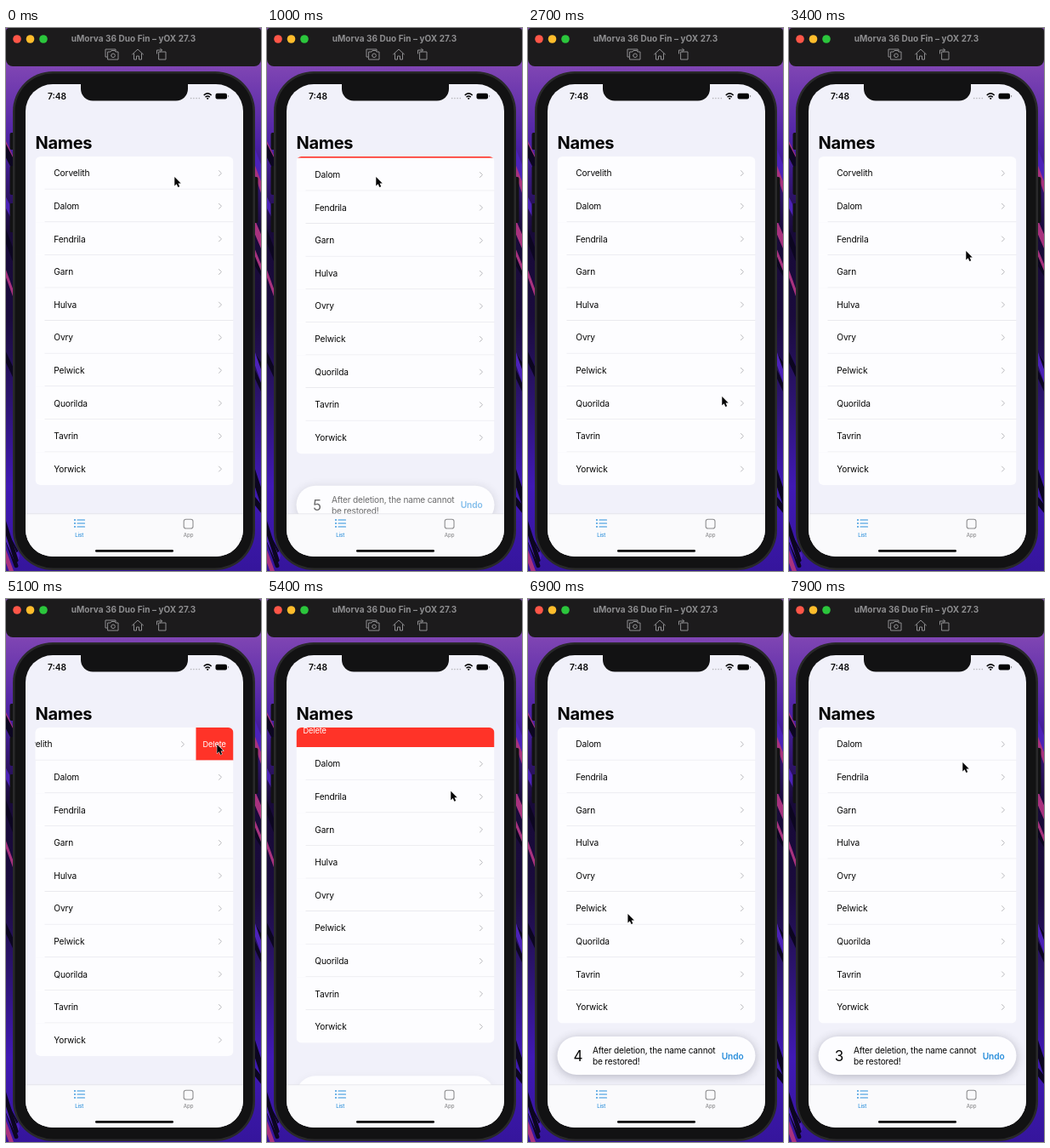
Animation, 300 px wide and 638 px high, one loop 8 s. Source, as an HTML page with a canvas:

```html
<!DOCTYPE html>
<html lang="en">
<head>
<meta charset="utf-8">
<title>Names list</title>
<style>
html, body { margin: 0; width: 100%; height: 100%; overflow: hidden; background: #12082c; }
canvas { display: block; width: 300px; height: 638px; }
</style>
</head>
<body>
<canvas id="stage"></canvas>
<script>
const W = 300, H = 638, LOOP = 8000, STEP = 100;
const LEFT = 34.5, RIGHT = 267.5, TOP = 151, ROW = 38.6, WIDTH = RIGHT - LEFT;
const NAMES = ['Corvelith', 'Dalom', 'Fendrila', 'Garn', 'Hulva',
  'Ovry', 'Pelwick', 'Quorilda', 'Tavrin', 'Yorwick'];
const FONT = 'Inter, "Liberation Sans", sans-serif';
const INK = '#050505', BLUE = '#2b8fdb', GREY = '#8e8e90', PAPER = '#f1f1fa',
  WHITE = '#fdfdff', RED = '#ff3328', CASE = '#121213';

// Moments of the user's actions, in ms
const DRAG_1 = 300, DROP_1 = 700, DELETE_1 = 800, UNDO = 2200,
  DRAG_2 = 3900, DROP_2 = 4300, DELETE_2 = 5300;

// Pointer stops: time, x, y
const PATH = [[0, 198, 175], [DRAG_1, 245, 175], [DROP_1, 128, 175], [1000, 128, 175],
  [1500, 153, 420], [1900, 240, 536], [UNDO, 240, 536], [3400, 208, 262],
  [DRAG_2, 234, 171], [DROP_2, 190, 171], [4900, 248, 171], [5200, 248, 171],
  [6000, 43, 522], [7900, 204, 192]];

const canvas = document.getElementById('stage');
const ratio = window.devicePixelRatio || 1;
canvas.width = W * ratio;
canvas.height = H * ratio;
const c = canvas.getContext('2d');
c.scale(ratio, ratio);

const clamp = (v, a, b) => Math.min(b, Math.max(a, v));
const mix = (a, b, u) => a + (b - a) * u;

function ease(t, start, length) {
  const u = clamp((t - start) / length, 0, 1);
  return u * u * (3 - 2 * u);
}

function pointer(t) {
  const i = clamp(PATH.findIndex(p => p[0] > t), 0, PATH.length);
  if (!i) return PATH[PATH.length - 1].slice(1);
  const [t0, x0, y0] = PATH[i - 1], [t1, x1, y1] = PATH[i];
  const u = ease(t, t0, t1 - t0);
  return [mix(x0, x1, u), mix(y0, y1, u)];
}

// The row follows the pointer while it is dragged, then slides away when deleted.
function swipe(t) {
  const [from, to, away] = t < UNDO ? [DRAG_1, DROP_1, DELETE_1] : [DRAG_2, DROP_2, DELETE_2];
  const drag = pointer(clamp(t, from, to))[0] - pointer(from)[0];
  return mix(drag, -WIDTH, ease(t, away - 150, 150));
}

const rowShare = t =>
  1 - ease(t, DELETE_1, 230) + ease(t, UNDO, 300) - ease(t, DELETE_2, 230);
const toastShare = t =>
  ease(t, DELETE_1, 360) - ease(t, UNDO, 360) + ease(t, DELETE_2, 360);

function box(x, y, w, h, r, fill) {
  c.beginPath();
  c.roundRect(x, y, w, h, r);
  if (fill) { c.fillStyle = fill; c.fill(); }
}

function rect(x, y, w, h, fill) {
  c.fillStyle = fill;
  c.fillRect(x, y, w, h);
}

function dot(x, y, r, fill) {
  c.beginPath();
  c.arc(x, y, r, 0, 7);
  c.fillStyle = fill;
  c.fill();
}

function stroke(path, color, width) {
  c.strokeStyle = color;
  c.lineWidth = width;
  c.lineCap = c.lineJoin = 'round';
  c.stroke(new Path2D(path));
}

function text(s, x, y, size, color = INK, weight = 400, align = 'left', spacing = 0) {
  c.font = `${weight} ${size}px ${FONT}`;
  c.letterSpacing = spacing + 'px';
  c.textAlign = align;
  c.fillStyle = color;
  c.fillText(s, x, y);
}

function wallpaper() {
  const g = c.createLinearGradient(0, 40, 0, H);
  ['#8247b4', '#4a20a4', '#180a38', '#1a0b3c', '#2c1470', '#4019b4', '#35159c']
    .forEach((k, i) => g.addColorStop(i / 6, k));
  rect(0, 0, W, H, g);
  let seed = 11;
  const random = () => (seed = seed * 16807 % 2147483647) / 2147483647;
  const tones = ['#a8327e', '#0c0620', '#4c22b8', '#0c0620'];
  for (let i = 0; i < 24; i++) {
    const x = i % 2 * 292, y = 130 + random() * 480;
    stroke(`M${x - 4} ${y}l16 ${20 + random() * 30}`, tones[i % 8 >> 1], 3 + random() * 5);
  }
}

function titleBar() {
  box(0, 0, W, 45, [4, 4, 8, 8], '#1c1b1c');
  ['#ff5648', '#ffbd2c', '#2bc63c'].forEach((k, i) => dot(13 + i * 15.5, 13, 4.8, k));
  text('uMorva 36 Duo Fin – yOX 27.3', 150, 16.4, 10, GREY, 700, 'center', 0.05);
  stroke('M119 34h-2v-9h12v2M120 28h3l1-1.5h4l1 1.5h3v9h-12z', GREY, 1);
  stroke('M123.7 32.3a2.3 2.3 0 1 0 4.6 0a2.3 2.3 0 1 0-4.6 0', GREY, 1);
  stroke('M148.5 31l6.5-6 6.5 6M150.5 30v7h3v-4h3v4h3v-7', GREY, 1);
  stroke('M180 28h8v9h-8zM177.5 30v-4h6M181.5 24l2 2-2 2', GREY, 1);
}

function phoneBody() {
  box(4.5, 123, 5, 20, 2, CASE);
  box(4.5, 162, 5, 34, 2, CASE);
  box(4.5, 206, 5, 34, 2, CASE);
  box(291, 175, 5.5, 54, 2, CASE);
  box(8, 51, 285, 586, 47, '#29292a');
  box(10.5, 53.5, 280, 581, 44.5, CASE);
  box(23, 66, 256, 555, 32, PAPER);
}

function statusBar() {
  box(88, 64, 126, 21.5, [0, 0, 14, 14], CASE);
  text('7:48', 60, 84, 10.2, INK, 600, 'center');
  for (let i = 0; i < 4; i++) dot(217.7 + i * 3.2, 82.6, 0.8, '#b4b4b8');
  stroke('M233.2 78.6q4-3.4 8 0M235 80.8q2.2-1.8 4.4 0', INK, 1.5);
  dot(237.2, 82.8, 1.1, INK);
  box(246.5, 76.8, 13.5, 6.6, 2, INK);
  stroke('M261.6 79.4v1.4', GREY, 1);
}

function row(name, x, y, last) {
  rect(x, y, WIDTH, ROW + 0.3, WHITE);
  text(name, x + 21.8, y + 23.3, 10.2, INK, 400, 'left', -0.15);
  stroke(`M${x + 216} ${y + 16.7}l3 3-3 3`, '#b9b9bd', 1);
  if (!last) rect(x + 11, y + ROW - 0.7, WIDTH, 0.7, '#e2e2e7');
}

function list(t) {
  const dx = swipe(t), h = ROW * rowShare(t), y = TOP + h - ROW;
  text('Names', 34.5, 142, 20, INK, 700, 'left', -0.3);
  c.save();
  box(LEFT, TOP, WIDTH, h + ROW * 9, 6);
  c.clip();
  row(NAMES[0], LEFT + (t < UNDO || t >= DRAG_2 ? dx : 0), y);
  if (dx < 0) {
    rect(RIGHT + dx, y, -dx, ROW, RED);
    text('Delete', RIGHT + dx + 8, y + 22.6, 9.2, '#fff', 400, 'left', -0.1);
  }
  NAMES.slice(1).forEach((name, i) => row(name, LEFT, TOP + h + i * ROW, i === 8));
  c.restore();
}

function toast(t) {
  const share = toastShare(t);
  if (share <= 0) return;
  const since = t - (t < DELETE_2 ? DELETE_1 : DELETE_2);
  const count = 5 - Math.floor(since / 1000);
  c.save();
  c.beginPath();
  c.rect(23, 86, 256, 485);
  c.clip();
  c.translate(0, 57 * (1 - share));
  c.shadowColor = `rgba(40,40,60,${0.3 * share})`;
  c.shadowBlur = 12 * ratio;
  c.shadowOffsetY = 2 * ratio;
  box(LEFT, 514, WIDTH, 45, 22.5, WHITE);
  c.shadowColor = 'transparent';
  c.globalAlpha = share;
  text(count, 59, 543, 17, INK, 400, 'center');
  text('After deletion, the name cannot', 76, 533.8, 10.1, INK, 400, 'left', -0.18);
  text('be restored!', 76, 547.2, 10.1, INK, 400, 'left', -0.18);
  text('Undo', 240.6, 540.6, 10.2, BLUE, 600, 'center', -0.1);
  c.restore();
}

function tabBar() {
  box(23, 571, 256, 50, [0, 0, 32, 32], '#fafafc');
  rect(23, 570.5, 256, 0.7, '#e0e0e5');
  for (let y = 578; y < 590; y += 4) {
    dot(81, y, 0.9, BLUE);
    stroke(`M84 ${y}h8.5`, BLUE, 1.1);
  }
  text('List', 86.3, 598.2, 6, BLUE, 500, 'center');
  box(209.2, 577.2, 10.8, 10.8, 2.6);
  c.strokeStyle = GREY;
  c.lineWidth = 1.1;
  c.stroke();
  text('App', 214.6, 598.2, 6, GREY, 500, 'center');
  box(105, 613, 92, 2.8, 1.4, INK);
}

function cursor(t) {
  const arrow = 'M.3 0v10.4l2.4-2.2 1.7 3.8 1.8-.8-1.7-3.7h3.2z';
  c.save();
  c.translate(...pointer(t));
  stroke(arrow, '#f6f6f8', 1);
  c.fillStyle = INK;
  c.fill(new Path2D(arrow));
  c.restore();
}

const start = performance.now();

function draw() {
  const t = Math.floor((performance.now() - start) % LOOP / STEP) * STEP;
  wallpaper();
  titleBar();
  phoneBody();
  statusBar();
  list(t);
  toast(t);
  tabBar();
  cursor(t);
  requestAnimationFrame(draw);
}

draw();
</script>
</body>
</html>
```
